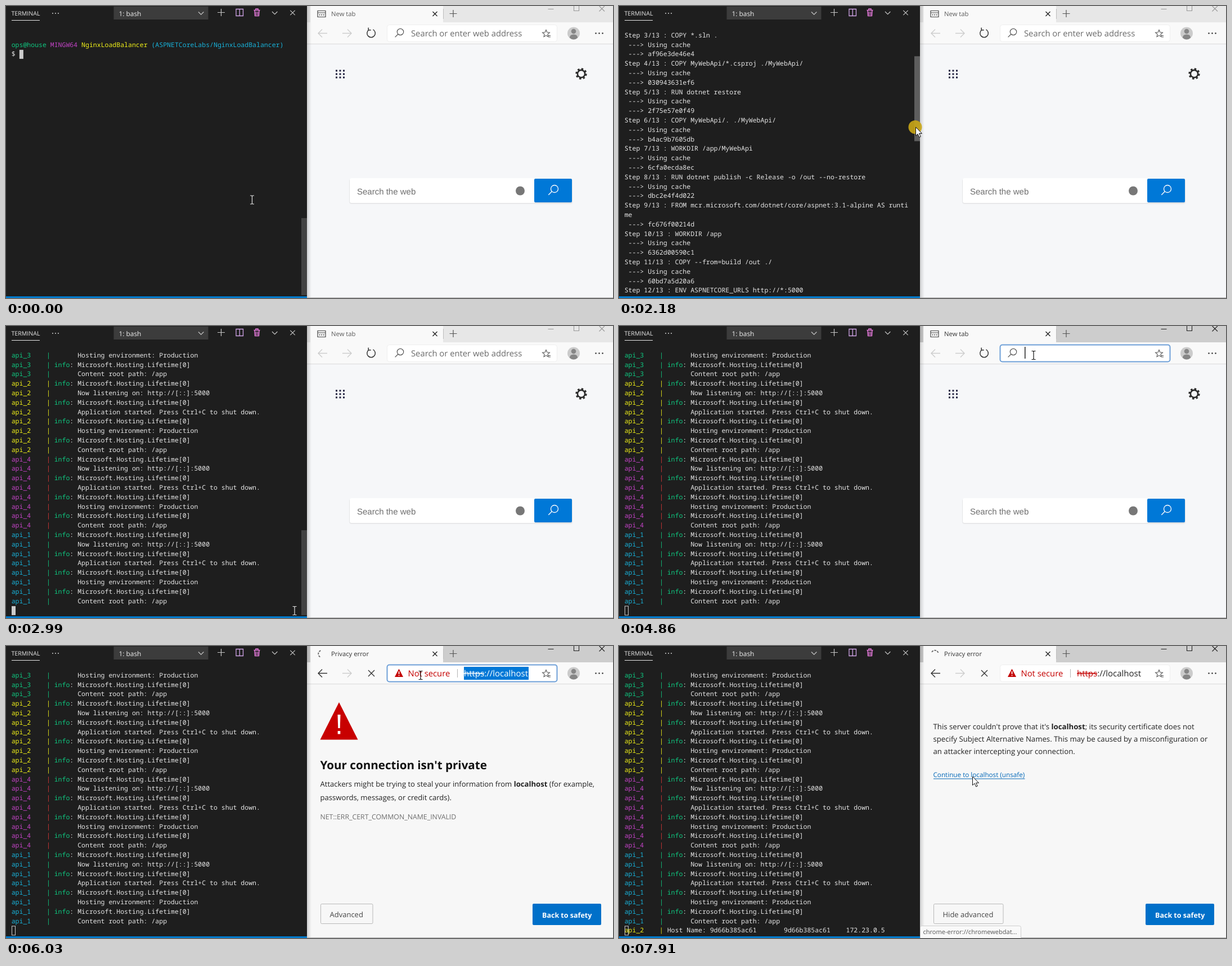
These frames come from a looping animation (1079 px wide and 519 px high, 8 s). An HTML page:

```html
<!DOCTYPE html>
<html lang="en">
<head>
<meta charset="utf-8">
<title>Load balancer demo</title>
<style>
html, body { margin: 0; width: 100%; height: 100%; overflow: hidden; background: #1e1e1e; }
svg { display: block; width: 1079px; height: 519px; }
text { white-space: pre; text-rendering: geometricPrecision; font-family: "Open Sans", "Noto Sans", sans-serif; }
#rows text { font: 500 11.53px "Noto Sans Mono", monospace; }
.b { font-weight: 700; }
</style>
</head>
<body>
<svg id="stage" viewBox="0 0 1079 519" xmlns="http://www.w3.org/2000/svg"></svg>
<script>
const LOOP = 8000, ROW = 16.8, CHAR = 6.92, LEFT = 9.7, VIEW = 28;
const COLORS = { w: '#e6e6e6', g: '#0fc880', y: '#f0f018', m: '#c443c7', c: '#18b2da', r: '#d93535' };

// ---------- markup helpers ----------
const rect = (x, y, w, h, fill, more = '') =>
  `<rect x="${x}" y="${y}" width="${w}" height="${h}" fill="${fill}" ${more}/>`;
const line = (d, color, w = 1.2, more = '') =>
  `<path d="${d}" fill="none" stroke="${color}" stroke-width="${w}" ${more}/>`;
const shape = (d, fill, more = '') => `<path d="${d}" fill="${fill}" ${more}/>`;
const dot = (x, y, r, fill, more = '') => `<circle cx="${x}" cy="${y}" r="${r}" fill="${fill}" ${more}/>`;
const text = (x, y, size, fill, s, more = '') =>
  `<text x="${x}" y="${y}" font-size="${size}" fill="${fill}" ${more}>${s}</text>`;
const group = (id, ...parts) => `<g id="${id}">${parts.join('')}</g>`;
const lens = (x, y, r, color, w) =>
  dot(x, y, r, 'none', `stroke="${color}" stroke-width="${w}"`) +
  line(`M${x - r * .7} ${y + r * .7}l${-r * .95} ${r * .95}`, color, w);
const dots = (x, y, gap, r, color) => [0, 1, 2].map(i => dot(x + i * gap, y, r, color)).join('');
const cross = (x, y, r, color, w) =>
  line(`M${x - r} ${y - r}l${2 * r} ${2 * r}M${x + r} ${y - r}l${-2 * r} ${2 * r}`, color, w);
const plus = (x, y, r, color) => line(`M${x - r} ${y}h${2 * r}M${x} ${y - r}v${2 * r}`, color, 1.2);

// ---------- terminal content ----------
// {g} and the like switch the colour inside a line
const COMMAND = 'docker-compose up --build --scale api=4';

function buildLog() {
  const log = ['', '{g}ops@house {m}MINGW64 {y}NginxLoadBalancer {c}(ASPNETCoreLabs/NginxLoadBalancer)',
    '$ ' + COMMAND, 'Building api'];
  const image = 'FROM mcr.microsoft.com/dotnet/core/';
  const steps = [
    [image + 'sdk:3.1-alpine AS build', 'b1d0a64e3f27'],
    ['WORKDIR /app', '7c25e90bd318'],
    ['COPY *.sln .', 'af96e3de46e4'],
    ['COPY MyWebApi/*.csproj ./MyWebApi/', '030943631ef6'],
    ['RUN dotnet restore', '2f75e57e0f49'],
    ['COPY MyWebApi/. ./MyWebApi/', 'b4ac9b7605db'],
    ['WORKDIR /app/MyWebApi', '6cfa0ecda8ec'],
    ['RUN dotnet publish -c Release -o /out --no-restore', 'dbc2e4f4d022'],
    [image + 'aspnet:3.1-alpine AS runtime', 'fc676f00214d'],
    ['WORKDIR /app', '6362d00590c1'],
    ['COPY --from=build /out ./', '60bd7a5d20a6'],
    ['ENV ASPNETCORE_URLS http://*:5000', '41be07c9d3fa'],
    ['ENTRYPOINT ["dotnet", "MyWebApi.dll"]', 'e83f5a1c0b96']
  ];
  const wrap = s => { for (let i = 0; i < s.length; i += 73) log.push(s.slice(i, i + 73)); };
  steps.forEach(([cmd, hash], i) => {
    wrap(`Step ${i + 1}/13 : ${cmd}`);
    if (!cmd.startsWith('FROM')) log.push(' ---> Using cache');
    log.push(' ---> ' + hash);
  });
  log.push('', 'Successfully built e83f5a1c0b96', 'Successfully tagged nginxloadbalancer_api:latest');
  const names = ['api_1', 'api_2', 'api_3', 'api_4', 'nginx_1'].map(n => 'nginxloadbalancer_' + n);
  const job = s => log.push(s.padEnd(46) + '... {g}done');
  [5, 6, 7].forEach(n => job('Stopping and removing nginxloadbalancer_api_' + n));
  names.forEach(n => job('Starting ' + n));
  wrap('Attaching to ' + names.join(', '));
  const notes = ['Now listening on: http://[::]:5000', 'Application started. Press Ctrl+C to shut down.',
    'Hosting environment: Production', 'Content root path: /app'];
  [[3, 'g', 'g'], [2, 'y', 'y'], [4, 'm', 'r'], [1, 'c', 'g']].forEach(([n, name, bar]) => {
    const head = `{${name}}api_${n}    {${bar}}| `;
    notes.forEach(s => log.push(head + '{g}info{w}: Microsoft.Hosting.Lifetime[0]', head + '{w}      ' + s));
  });
  log.push('{y}api_2    | {w}Host Name: 9d66b385ac61       9d66b385ac61    172.23.0.5');
  return log;
}
const LOG = buildLog(), END = LOG.length - 1, BOTTOM = END - VIEW + 1;

const colored = s => s.split(/\{(\w)\}/).map((part, i, all) =>
  i % 2 || !part ? '' : `<tspan fill="${COLORS[all[i - 1] || 'w']}">${part}</tspan>`).join('');

// ---------- static drawing ----------
const INK = '#c5c5c5';
const terminal = rect(0, 0, 535, 519, '#1e1e1e') +
  text(9.5, 17, 10.6, '#e7e7e7', 'TERMINAL') + rect(10, 25, 50, 1, '#e7e7e7') + dots(83, 13, 5, 1.1, INK) +
  rect(191.5, 1, 168, 23, '#3c3c3c') + text(200.5, 17.5, 11.9, '#f0f0f0', '1: bash') +
  line('M342 10.5l4.7 4.7 4.7-4.7', INK) + plus(382.5, 11.5, 6.5, INK) +
  line('M409 5.5h12.5v12h-12.5zM415.3 5.5v12', '#cfa3e6', 1.3) +
  line('M440.5 7.5h11M444 7v-2h4v2M442 8l.6 9.5h6.8l.6-9.5M444.5 10v6M447.5 10v6', '#e479da', 1.5) +
  line('M473 10l4.7 4.7 4.7-4.7', INK) + cross(509.5, 12, 4.2, INK, 1.2) +
  '<g id="rows"></g><rect id="cursor" y="0" width="7" height="16"/>' +
  '<rect id="thumb" x="525" width="10"/>' + rect(0, 516, 535, 3, '#007acc');

const chrome =
  rect(535, 0, 544, 519, '#f6f7f9') + '<rect id="strip" x="535" y="0" width="544" height="29"/>' +
  rect(541, 0, 236, 30, '#f9f9f9') + rect(535, 29, 544, 39, '#f9f9f9') + rect(535, 67, 544, 1, '#dadada') +
  group('tabIcon',
    line('M554 8.5h14v11h-14zM554 12h14', '#444', 1.2) + dots(557.5, 15.7, 3.6, 1, '#444')) +
  '<circle id="spin" cx="561.5" cy="14" r="6.3" fill="none" stroke="#666" stroke-width="1.8" stroke-dasharray="3.5 1.7 3.5 1.7 3.5 40"/>' +
  '<text id="title" x="578" y="18" font-size="11.3"></text>' +
  cross(762.5, 14, 4, '#222', 1.3) + rect(777, 5, 1, 18, '#bdbdbd') + plus(795, 13.5, 6.5, '#555') +
  `<g id="winButtons">${line('M963.5 5.5h10M1009.5-1v9.5h9v-9.5M1054.5 0l9.5 9.5M1064 0l-9.5 9.5', 'currentColor', 1.1)}</g>` +
  `<g id="back">${line('M571 48.5h-15.5M562 41.5l-7 7 7 7', 'currentColor', 1.4)}</g>` +
  line('M598 48.5h15.5M607 41.5l7 7-7 7', '#cdcdcd', 1.4) +
  group('reload', line('M645 42.3a7.3 7.3 0 1 0 7.5-.4M644.2 38.5v4.3h4.5', '#333', 1.5)) +
  group('stop', cross(649.5, 48.5, 5.5, '#333', 1.4)) +
  '<rect id="box" x="677.5" y="33.5" width="302" height="30" rx="4" fill="#fff"/>' +
  line('M960 42.5l1.8 4.3 4.6.4-3.5 3 1 4.5-3.9-2.4-3.9 2.4 1-4.5-3.5-3 4.6-.4zM963 52.5h5M964 55h4', '#555', 1.1) +
  dot(1009, 48.5, 11, '#cbcbcb') + dot(1009, 45, 4.3, '#868686') +
  shape('M1002 56.5q0-6 7-6t7 6q-3 3-7 3t-7-3z', '#868686') + dots(1048.5, 48.5, 6, 1.3, '#333') +
  group('search', lens(701, 46, 5.7, '#555', 1.2)) +
  group('hint', text(720, 54, 14.8, '#6b6b6b', 'Search or enter web address')) +
  '<text id="typed" x="720.5" y="54" font-size="14.9" fill="#222"></text>' +
  '<rect id="caret" y="37" width="1.5" height="21" fill="#222"/>' +
  group('unsafe',
    shape('M698.5 40.5l7.5 14.5h-15z', '#c40000') + rect(697.7, 45, 1.7, 5, '#fff') + rect(697.7, 51.5, 1.7, 1.7, '#fff') +
    text(714.5, 54, 14.8, '#c40000', 'Not secure') + rect(802, 41, 1, 15, '#b5b5b5') +
    rect(814, 37, 115, 23, '#0078d7', 'id="mark"') +
    '<text x="814" y="54" font-size="15" id="url"><tspan id="scheme" text-decoration="line-through">https</tspan>://localhost</text>');

const gridDots = [115, 121, 127].map(y =>
  [587.5, 594, 600.5].map(x => rect(x - 1.5, y - 1.5, 3, 3, '#1f1f3d')).join('')).join('');
const newTab = group('newTab', gridDots,
  dot(1022.5, 120.5, 6.6, 'none', 'stroke="#2b2b2b" stroke-width="2.6"'),
  dot(1022.5, 120.5, 8.8, 'none', 'stroke="#2b2b2b" stroke-width="2.8" stroke-dasharray="3.45 3.46"'),
  rect(610, 307, 397, 45, '#000', 'rx="4" opacity=".05"'), rect(610.5, 306.5, 396, 44, '#000', 'rx="4" opacity=".05"'),
  rect(611, 306, 330, 44, '#fff', 'rx="3"'),
  text(624, 334.5, 15, '#6f6f6f', 'Search the web', 'style="font-family:\'Liberation Sans\',sans-serif"'),
  dot(914, 328.5, 8, '#777'),
  rect(939, 307, 67, 42, '#0078d7', 'rx="2"'), lens(975, 325, 6.5, '#fff', 1.3));

const BODY = '#222', PAGE = '#f7f7f7';
const button = (w, label) =>
  rect(559.5, 458.5, w, 35, PAGE, 'rx="2" stroke="#b9b9b9"') + text(575.5, 481.7, 13, '#444', label);
const errorPage = group('errorPage', rect(536, 68, 543, 451, PAGE),
  group('summary',
    shape('M592 100l33.5 66.5h-67z', '#c80000'),
    shape('M589.5 122h5l-.8 24h-3.4z', '#fff'), rect(589.7, 151, 4.6, 5.5, '#fff'),
    text(558.5, 218.5, 20.6, '#111', "Your connection isn't private", 'class="b"'),
    text(558.5, 249.5, 13.1, BODY, 'Attackers might be trying to steal your information from <tspan class="b">localhost</tspan> (for example,'),
    text(558.5, 273.5, 13.1, BODY, 'passwords, messages, or credit cards).'),
    text(558.5, 308, 12.3, '#6e6e6e', 'NET::ERR_CERT_COMMON_NAME_INVALID'),
    button(92.5, 'Advanced')),
  group('details',
    text(558.5, 148, 13.2, BODY, 'This server couldn\'t prove that it\'s <tspan class="b">localhost</tspan>; its security certificate does not'),
    text(558.5, 170, 13.2, BODY, 'specify Subject Alternative Names. This may be caused by a misconfiguration or'),
    text(558.5, 192, 13.2, BODY, 'an attacker intercepting your connection.'),
    text(558.5, 233, 11.7, '#0067b8', 'Continue to localhost (unsafe)'), rect(559, 235.5, 162.5, 1, '#0067b8'),
    button(123.5, 'Hide advanced')),
  rect(936, 458, 122, 38, '#0070c9', 'rx="2"'), text(953, 482.5, 12.5, '#fff', 'Back to safety', 'class="b"'));

const menu = group('menu', rect(676, 64, 304, 89, '#000', 'opacity=".12" rx="4"'),
  rect(677, 63, 302, 87, '#fff', 'rx="3"'), rect(677, 70, 302, 36, '#e5e5e5'),
  lens(701, 126, 5, '#555', 1.2), line('M694.5 81h9l3 3v11h-12z', '#555', 1.1),
  text(720.5, 93, 13.5, '#222', 'https://localhost'), text(720.5, 132, 13.5, '#222', 'localhost'));

const bubble = group('bubble', rect(535.5, 497.5, 179, 24, '#f9f9f9', 'rx="3" stroke="#cfcfcf"'),
  text(540.5, 512, 11.07, '#555', 'chrome-error://chromewebdat...'));

const mouse = group('mouse',
  group('glow', dot(-.5, 0, 12, '#c9a616', 'opacity=".9"')),
  group('beam', line('M-3.5-7.5h2.5l1 1 1-1h2.5M0-6.5v13M-3.5 7.5h2.5l1-1 1 1h2.5', 'currentColor', 1.2)),
  group('arrow', shape('M.5 0v15.5l3.6-3.3 2.6 5.9 2.5-1.1-2.6-5.7h4.9z', '#fff', 'stroke="#111"')));

const stage = document.getElementById('stage');
stage.innerHTML = `<defs><linearGradient id="edge"><stop stop-color="#000" stop-opacity=".16"/>
  <stop offset="1" stop-color="#000" stop-opacity="0"/></linearGradient></defs>` +
  terminal + chrome + newTab + errorPage + menu + rect(535, 0, 8, 519, 'url(#edge)') +
  rect(535, 518, 544, 1, '#b0b0b0') + bubble + mouse;

// ---------- motion ----------
const el = {};
stage.querySelectorAll('[id]').forEach(e => el[e.id] = e);
const show = (id, on) => { el[id].style.display = on ? '' : 'none'; };
const set = (id, attrs) => { for (const k in attrs) el[id].setAttribute(k, attrs[k]); };
const ease = (t, a, b) => { const p = Math.min(1, Math.max(0, (t - a) / (b - a))); return p * p * (3 - 2 * p); };
const mix = (a, b, p) => a + (b - a) * p;
const last = (list, t) => list.filter(k => k[0] <= t).pop()[1];

const SCROLL = [[0, 0], [1870, 0], [1960, 1], [2030, 3], [2100, 6], [2180, 9], [2280, 22], [2360, 34],
  [2440, 46], [2500, 53], [2570, 58], [2650, BOTTOM]];
const TYPED = [[0, ''], [4960, 'https://l'], [5040, 'https://loca'], [5120, 'https://localhost']];
const RUN = 540, RETURN = 1550, BUILD = 1710, GRAB = 1870, DROP = 2870, LEAVE = 2990,
  FOCUS = 4000, ENTER = 5280, ERROR = 5650, OPEN = 6750, REPLY = 7850;
let shown = '';

function drawTerminal(t) {
  const top = last(SCROLL, t);
  const rows = t < BUILD ? 3 : t < GRAB ? 4 : t < REPLY ? END : END + 1;
  const typed = t >= RUN;
  const key = [top, rows, typed].join();
  if (key !== shown) {
    shown = key;
    el.rows.innerHTML = LOG.slice(top, Math.min(rows, top + VIEW)).map((s, i) =>
      `<text x="${LEFT}" y="${(55.8 + ROW * i).toFixed(1)}">${colored(top + i === 2 && !typed ? '$ ' : s)}</text>`).join('');
  }
  const row = (t < RETURN ? 2 : Math.min(rows, END)) - top;
  const col = t < RUN ? 2 : t < RETURN ? 2 + COMMAND.length : 0;
  const hollow = t >= FOCUS;
  show('cursor', row < VIEW);
  set('cursor', { x: hollow ? 10.5 : 10 + CHAR * col, y: 44.3 + ROW * row, width: hollow ? 6 : 7,
    fill: hollow ? 'none' : '#cccccc', stroke: hollow ? '#cccccc' : 'none' });
  const early = t < GRAB, drag = !early && t < DROP;
  const y = early ? 377 : mix(41, 363, top / BOTTOM);
  show('thumb', t < FOCUS);
  set('thumb', { y, height: early ? 137 : 151, fill: drag ? '#5e5e5e' : !early && t < LEAVE ? '#4f4f4f' : '#424242' });
  return 216 + (y - 90) * 1.045;
}

function drawBrowser(t) {
  const focus = t >= FOCUS, busy = t >= ENTER, error = t >= ERROR, open = t >= OPEN;
  const ring = focus && !open;
  set('strip', { fill: focus ? '#cdcdcd' : '#e7e7e7' });
  set('winButtons', { color: focus ? '#222' : '#999' });
  set('back', { color: error ? '#333' : '#cdcdcd' });
  set('title', { fill: focus ? '#333' : '#5c5c5c' });
  el.title.textContent = error ? 'Privacy error' : 'New tab';
  set('box', { stroke: ring ? '#6fa0d8' : '#efefef', 'stroke-width': ring ? 2 : 1 });
  show('tabIcon', !busy);
  show('spin', busy);
  set('spin', { transform: `rotate(${120 + (t - 6030) * .431} 561.5 14)` });
  show('reload', !busy);
  show('stop', busy);
  show('search', !error);
  show('hint', !focus);
  const typed = last(TYPED, t);
  show('typed', !error);
  el.typed.textContent = typed;
  show('caret', focus && !busy && (t < 4320 || t >= 4860));
  set('caret', { x: 721 + (typed ? el.typed.getComputedTextLength() : 0) });
  show('menu', typed && !busy);
  show('unsafe', error);
  show('mark', !open);
  set('url', { fill: open ? '#222' : '#fff' });
  set('scheme', { fill: open ? '#c40000' : '#fff' });
  show('newTab', !error);
  show('errorPage', error);
  show('summary', !open);
  show('details', open);
  show('bubble', t >= REPLY);
}

function drawMouse(t, dragY) {
  const drag = t >= GRAB && t < LEAVE, arrow = drag || t >= 6130;
  let x, y;
  if (t < BUILD) [x, y] = [437.5, 344.5];
  else if (drag) {
    const p = t < DROP ? 0 : t < 2930 ? .3 : .7;
    [x, y] = [mix(527, 513, p), mix(dragY, 506, p)];
  } else if (t < FOCUS) [x, y] = [513, 506];
  else {
    const down = ease(t, 6100, 6680), up = ease(t, 6930, 7650);
    x = mix(mix(737, 605, down), 628, up);
    y = mix(mix(52, 478, down), 232, up);
  }
  show('mouse', t < BUILD || t >= GRAB);
  set('mouse', { transform: `translate(${x} ${y})` });
  show('glow', drag && t < DROP);
  show('arrow', arrow);
  show('beam', !arrow);
  set('beam', { color: t < FOCUS ? '#e0e0e0' : '#111' });
}

function draw(t) {
  const dragY = drawTerminal(t);
  drawBrowser(t);
  drawMouse(t, dragY);
}

const start = performance.now();
function tick() {
  draw((performance.now() - start) % LOOP);
  requestAnimationFrame(tick);
}
tick();
</script>
</body>
</html>
```
